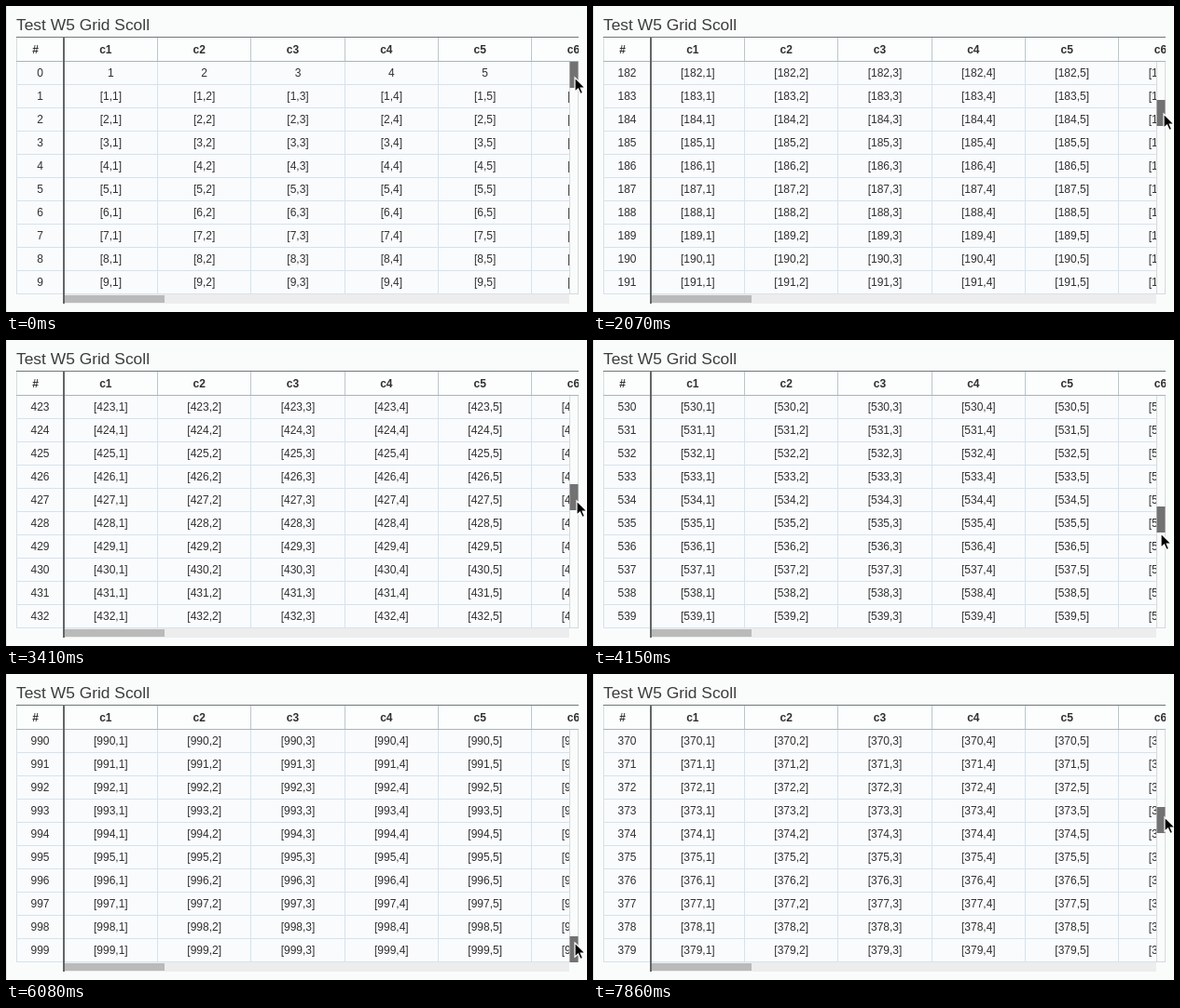
An HTML page that plays this animation: 623 px wide and 329 px high, repeating every 8 s.

```html
<!DOCTYPE html>
<html lang="en">
<head>
<meta charset="utf-8">
<title>Grid scroll</title>
<style>
  html, body { margin: 0; width: 100%; height: 100%; overflow: hidden; background: #fafcfc; }
  svg { display: block; width: 623px; height: 329px; font: 12px "Liberation Sans", Arial, sans-serif; }
  text { fill: #303030; text-anchor: middle; }
  .title { font-size: 17.4px; fill: #3c3c3c; text-anchor: start; }
  .head { font-weight: bold; }
</style>
</head>
<body>
<svg id="stage" viewBox="0 0 623 329">
  <defs>
    <clipPath id="headClip"><rect x="11" y="33" width="603" height="27"/></clipPath>
    <clipPath id="bodyClip"><rect x="11" y="60" width="593" height="250"/></clipPath>
  </defs>
</svg>
<script>
const LOOP = 8000, TICKS = 54, ROWS = 10, COLS = 6;
const TOP = 60, ROW_H = 25, COL_X = 62, COL_W = 100.33;
const TRAVEL = 222, LAST_ROW = 990;

// tick, thumb offset, pointer x, pointer y
const drag = [
  [0, 0, 610, 77], [1, 3, 610, 79], [2, 9, 611, 85], [3, 9, 611, 85],
  [5, 22, 611, 96], [14, 43, 612, 118], [19, 67, 612, 145],
  [25, 109, 612, 187], [27, 109, 612, 187], [28, 119, 609, 208],
  [35, 195, 609, 278], [39, 222, 609, 297], [40, 222, 609, 297],
  [41, 222, 610, 289], [42, 213, 610, 279], [53, 83, 613, 154]
];

const stage = document.getElementById('stage');

function add(parent, tag, attrs, content = '') {
  const node = document.createElementNS('http://www.w3.org/2000/svg', tag);
  for (const name in attrs) node.setAttribute(name, attrs[name]);
  node.textContent = content;
  parent.appendChild(node);
  return node;
}
const box = (parent, x, y, width, height, fill) =>
  add(parent, 'rect', { x, y, width, height, fill });
const label = (parent, x, y, content, cls = '') =>
  add(parent, 'text', { x, y, class: cls }, content);
const colLine = c => Math.round(COL_X + c * COL_W - 0.4);

box(stage, 0, 0, 1, 329, '#e2e5e6');
label(stage, 11, 26, 'Test W5 Grid Scoll', 'title');

const head = add(stage, 'g', { 'clip-path': 'url(#headClip)' });
box(head, 11, 33, 603, 27, '#fcfefd');
box(head, 11, 34, 1, 26, '#d5dcdf');
label(head, 31.5, 51, '#', 'head');

const body = add(stage, 'g', { 'clip-path': 'url(#bodyClip)' });
box(body, 11, 60, 593, 250, '#fafbfd');
box(body, 11, 60, 1, 250, '#d8e0e6');

for (let c = 1; c <= COLS; c++) {
  label(head, 6.5 + c * COL_W, 51, 'c' + c, 'head');
  if (c < COLS) {
    box(head, colLine(c), 34, 1, 26, '#b9c7cb');
    box(body, colLine(c), 60, 1, 250, '#d4e3ee');
  }
}
box(head, 11, 33, 603, 1, '#707878');
box(head, 11, 59, 603, 1, '#a9b5b8');

const cells = [];
for (let r = 0; r < ROWS; r++) {
  const y = TOP + r * ROW_H;
  box(body, 11, y + 24, 593, 1, '#d4e3ee');
  cells.push(Array.from({ length: COLS + 1 }, (_, c) =>
    label(body, c ? 12 + c * COL_W : 36.5, y + 16, '')));
}

// scroll bars
box(stage, 604, 60, 10, 250, '#d6d9db');
box(stage, 605, 60, 8, 249, '#fafbfb');
box(stage, 62, 310, 542, 10, '#ededed');
box(stage, 63, 311, 107, 8, '#bababa');
box(stage, 61, 34, 2, 286, '#626666');
const thumb = box(stage, 604.5, TOP, 9, 28, '#727272');

const pointer = add(stage, 'path', {
  d: 'M0 0V15.2L3.5 12L6 17.6L8.6 16.4L6.2 11H11Z',
  fill: '#000', stroke: '#fff', 'stroke-width': 1.2
});

function poseAt(tick) {
  const i = Math.max(1, drag.findIndex(key => key[0] >= tick));
  const a = drag[i - 1], b = drag[i];
  const p = (tick - a[0]) / (b[0] - a[0]);
  return a.map((v, n) => Math.round(v + (b[n] - v) * p));
}

function cellText(row, c) {
  if (!c) return row;
  return row ? `[${row},${c}]` : c;
}

let shownTick = -1;
function draw(now) {
  const tick = Math.floor(now % LOOP / LOOP * TICKS + 0.02) % TICKS;
  if (tick !== shownTick) {
    shownTick = tick;
    const [, offset, x, y] = poseAt(tick);
    const first = Math.floor(offset * LAST_ROW / TRAVEL);
    cells.forEach((line, r) => line.forEach((cell, c) => {
      cell.textContent = cellText(first + r, c);
    }));
    thumb.setAttribute('y', TOP + offset);
    pointer.setAttribute('transform', `translate(${x} ${y})`);
  }
}

const start = performance.now();
function play() {
  draw(performance.now() - start);
  requestAnimationFrame(play);
}
play();
</script>
</body>
</html>
```
